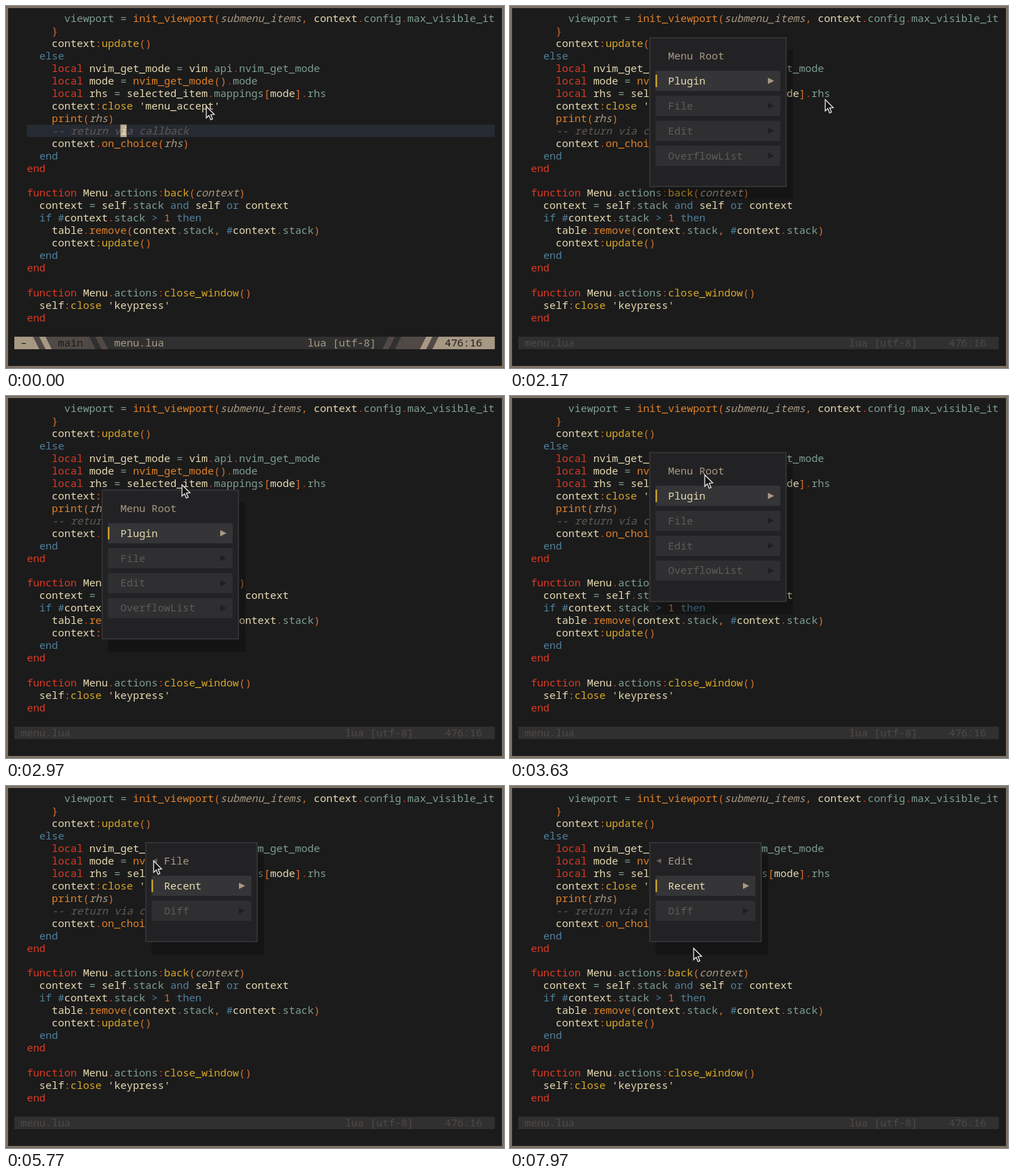
An HTML page with a canvas that plays this animation: 716x521 px, repeating every 8 s.

```html
<!DOCTYPE html>
<html lang="en">
<head>
<meta charset="utf-8">
<title>Editor menu</title>
<style>
html, body { margin: 0; width: 100%; height: 100%; overflow: hidden; background: #1b1b1b; }
canvas { display: block; }
</style>
</head>
<body>
<canvas id="stage" width="716" height="521"></canvas>
<script>
const ctx = document.getElementById('stage').getContext('2d');
const LOOP = 8000, STEP = 100 / 3, LAG = 75;
const CW = 8.97, RH = 17.96, LEFT = 12, TOP = 9, COLS = 77;
const FONT = '14.95px "Noto Sans Mono", "DejaVu Sans Mono", monospace';
const TAN = '#a89984', GRAY = '#504945', BAR = '#303030', BG = '#1b1b1b';

const INK = {
  f: '#e6dab2', r: '#dc3a24', b: '#4f809c', t: '#7f9f92', o: '#e0812a',
  y: '#d9a828', p: '#d9702f', a: TAN, c: '#5f5a54', n: '#dd6a50'
};

// "~" starts a token; the next letter picks its colour.
const CODE = `
~f      ~tviewport = ~oinit_viewport~p(~asubmenu_items~p, ~fcontext~r.~tconfig~r.~tmax_visible_it
~f    ~p}
~f    context~p:~yupdate~p()
~f  ~belse
~f    ~rlocal ~fnvim_get_mode ~t= ~fvim~r.~tapi~r.~tnvim_get_mode
~f    ~rlocal ~fmode ~t= ~onvim_get_mode~p()~r.~tmode
~f    ~rlocal ~frhs ~t= ~fselected_item~r.~tmappings~p[~fmode~p]~r.~trhs
~f    context~p:~yclose ~f'menu_accept'
~f    ~oprint~p(~arhs~p)
~f    ~c-- return via callback
~f    context~r.~oon_choice~p(~arhs~p)
~f  ~bend
~rend

~rfunction ~fMenu~r.~tactions~r:~yback~p(~acontext~p)
~f  context ~t= ~fself~r.~tstack ~band ~fself ~bor ~fcontext
~f  ~bif #~fcontext~r.~tstack ~b> ~n1 ~bthen
~f    table~r.~oremove~p(~fcontext~r.~tstack~p, ~b#~fcontext~r.~tstack~p)
~f    context~p:~yupdate~p()
~f  ~bend
~rend

~rfunction ~fMenu~r.~tactions~r:~yclose_window~p()
~f  self~p:~yclose ~f'keypress'
~rend`.slice(1).split('\n').map(line => line.split('~').slice(1));

const ROOT = { title: 'Menu Root', items: ['Plugin', 'File', 'Edit', 'OverflowList'], cols: 22 };
const sub = title => ({ title, items: ['Recent', 'Diff'], cols: 18, back: true });
const FILE = sub('File'), EDIT = sub('Edit');

// Pointer moves; those with control points are swept as Bezier curves.
const HOME = [288, 144];
const MOVES = [
  { from: 1170, to: 1870, end: [100, 52] },
  { from: 2025, to: 2500, end: [374, 369], bend: [[515, 60], [971, 427]] },
  { from: 2500, to: 3050, end: [280, 113], bend: [[-9, 369], [248, 108]] },
  { from: 4130, to: 4860, end: [283, 182] },
  { from: 5030, to: 5830, end: [211, 106] },
  { from: 5900, to: 6760, end: [223, 121] },
  { from: 6770, to: 7030, end: [262, 238] },
  { from: 7200, to: 7430, end: [266, 226] },
  { from: 7600, to: 7960, end: [264, 233] }
];

const clamp = (v, lo, hi) => Math.min(hi, Math.max(lo, v));
const colX = c => LEFT + c * CW;
const rowY = r => TOP + r * RH;
const ease = u => u * u * (3 - 2 * u);
const lerp = (a, b, u) => a.map((v, k) => v + (b[k] - v) * u);

function bezier(pts, u) {
  while (pts.length > 1) pts = pts.slice(1).map((p, i) => lerp(pts[i], p, u));
  return pts[0];
}

function pointerAt(t) {
  let pos = HOME;
  for (const { from, to, end, bend } of MOVES) {
    if (t < from) break;
    const u = clamp((t - from) / (to - from), 0, 1);
    pos = bend ? bezier([pos, ...bend, end], u) : lerp(pos, end, ease(u));
  }
  return pos;
}

function rect(x, y, w, h, color) {
  ctx.fillStyle = color;
  ctx.fillRect(x, y, w, h);
}

function poly(color, ...pts) {
  ctx.beginPath();
  for (let i = 0; i < pts.length; i += 2) ctx.lineTo(pts[i], pts[i + 1]);
  ctx.closePath();
  ctx.fillStyle = color;
  ctx.fill();
}

function text(str, col, row, color, italic) {
  ctx.font = (italic ? 'italic ' : '') + FONT;
  ctx.fillStyle = color;
  ctx.fillText(str, colX(col), rowY(row) + 14);
}

function drawCode(active) {
  if (active) rect(30, rowY(9), colX(COLS) - 30, RH, '#262a33');
  CODE.forEach((line, row) => {
    let col = 2;
    for (const token of line) {
      const key = token[0], str = token.slice(1);
      text(str, col, row, INK[key], key === 'a' || key === 'c');
      col += str.length;
    }
  });
  if (active) {
    rect(colX(17), rowY(9), CW, RH, '#bdae93');
    text('i', 17, 9, '#f2e5bc', true);
  }
}

// A slanted end and a separate stripe, running right (1) or left (-1).
function slant(col, dir, color) {
  const x = colX(col), w = CW * dir, y = rowY(26), b = y + RH;
  poly(color, x, y, x + w, b, x, b);
  poly(color, x + w, y, x + 2 * w, y, x + 3 * w, b, x + 2 * w, b);
}

function drawStatus(active) {
  const fill = (from, to, color) => rect(colX(from), rowY(26), (to - from) * CW, RH, color);
  fill(0, COLS, BAR);
  text('476:16', 69, 26, GRAY);
  if (!active) {
    text('menu.lua', 1, 26, GRAY);
    text('lua [utf-8]', 53, 26, GRAY);
    return;
  }
  fill(0, 12, GRAY);
  fill(0, 3, TAN);
  slant(3, 1, TAN);
  slant(12, 1, GRAY);
  fill(62, COLS, GRAY);
  fill(68, COLS, TAN);
  slant(62, -1, GRAY);
  slant(68, -1, TAN);
  text('–', 1, 26, BG);
  text('main', 7, 26, BG);
  text('menu.lua', 16, 26, TAN);
  text('lua [utf-8]', 47, 26, TAN);
  text('476:16', 69, 26, BG);
}

function drawMenu(menu, col, row, selected) {
  const x = colX(col), y = rowY(row), w = menu.cols * CW;
  const h = (menu.items.length * 2 + 4) * RH;
  rect(x + CW, y + RH, w, h, 'rgba(0,0,0,0.28)');
  rect(x, y, w, h, '#222224');
  ctx.strokeStyle = '#38383a';
  ctx.lineWidth = 1.5;
  ctx.strokeRect(x + 0.75, y + 0.75, w - 1.5, h - 1.5);

  text(menu.title, col + 3, row + 1, TAN);
  if (menu.back) {
    const ax = colX(col + 1), ay = rowY(row + 1.5);
    poly('#69625a', ax + 1, ay, ax + 8, ay - 3.5, ax + 8, ay + 3.5);
  }
  menu.items.forEach((label, i) => {
    const on = i === selected, r = row + 3 + i * 2, mid = rowY(r + 0.5);
    const ax = colX(col + menu.cols - 3);
    rect(x + CW, mid - 14.5, w - 2 * CW, 29, on ? '#353537' : '#2f2f31');
    if (on) rect(x + CW, mid - 9, 2, RH, '#e2b42c');
    text(label, col + 3, r, on ? '#e6dab2' : '#5f5b57');
    poly(on ? TAN : '#1f1f20', ax, mid - 4.5, ax + 9, mid, ax, mid + 4.5);
  });
}

function drawPointer([x, y]) {
  ctx.save();
  ctx.translate(x, y + 0.5);
  poly('#141414', 0, 0, 0, 16.5, 3.7, 13, 6.3, 19.3, 9, 18.1, 6.4, 12, 11.5, 11.6);
  ctx.strokeStyle = '#f4f4f4';
  ctx.lineWidth = 1.2;
  ctx.stroke();
  ctx.restore();
}

function openMenu(t) {
  if (t >= 4890 && t < 6300) return FILE;
  return t >= 7800 ? EDIT : ROOT;
}

// The root menu selects what is hovered; File stays lit after its submenu closes.
function selection(t, menu, y) {
  if (menu !== ROOT || t < 4000) return 0;
  return clamp(Math.floor((y - 126) / (2 * RH)), t > 4890 ? 1 : 0, 3);
}

function draw(t) {
  const active = t < 730, pointer = pointerAt(t);
  rect(0, 0, 716, 521, '#7c6f64');
  rect(3, 3, 710, 515, BG);
  drawCode(active);
  drawStatus(active);
  if (!active) {
    // The menu trails the drag and snaps to whole cells.
    const [gx, gy] = pointerAt(clamp(t - LAG, 2000, 3300));
    const col = clamp(Math.floor((gx - LEFT) / CW) - 8, 0, 54);
    const row = clamp(Math.floor((gy - TOP) / RH) - 1, 0, 14);
    const menu = openMenu(t);
    drawMenu(menu, col, row, selection(t, menu, pointer[1]));
  }
  drawPointer(pointer);
}

const start = performance.now();
function tick() {
  const t = Math.max(0, performance.now() - start) % LOOP;
  draw(Math.floor((t + 0.5) / STEP) * STEP % LOOP);
  requestAnimationFrame(tick);
}
tick();
</script>
</body>
</html>
```
